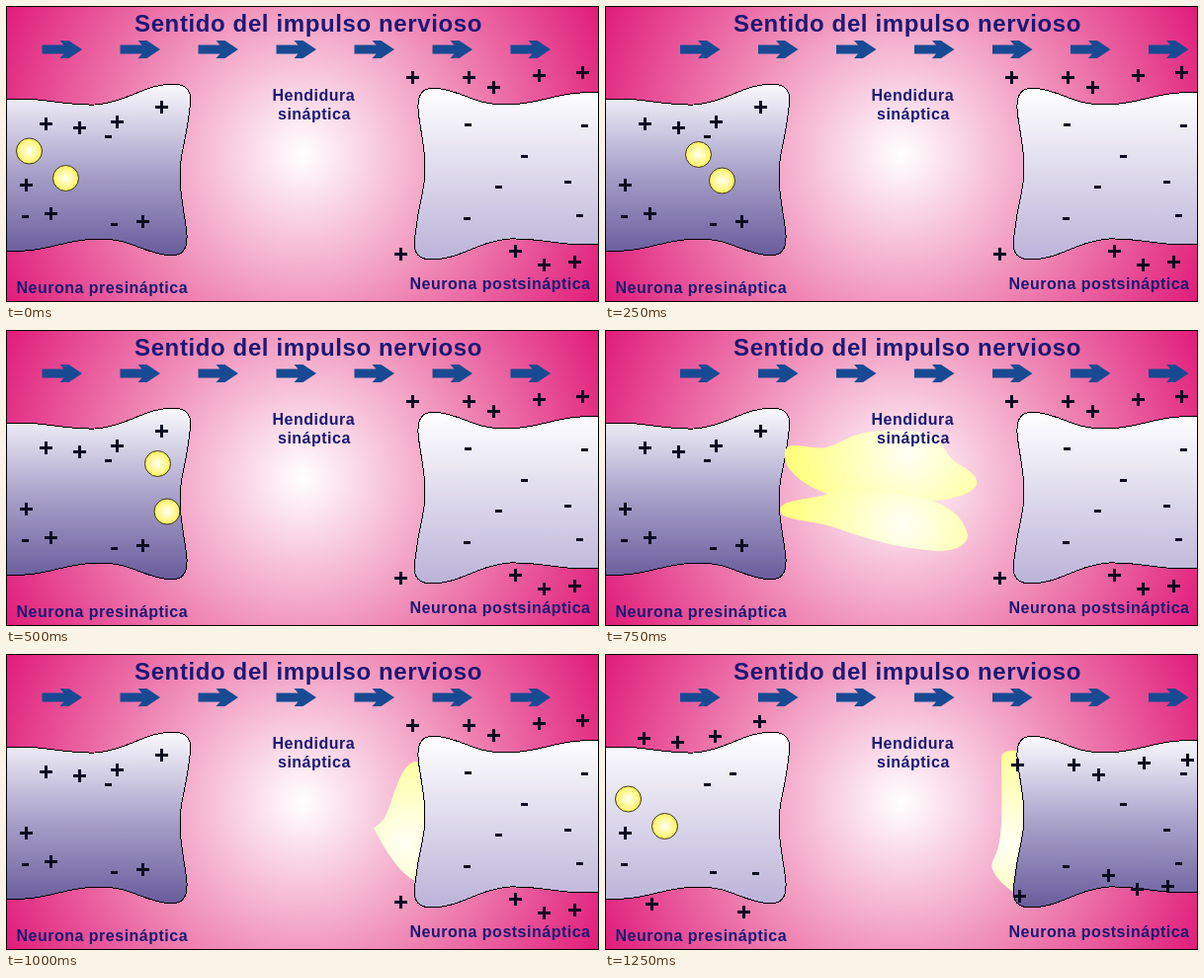
Recreate the animation shown at these times as an HTML page. Size 600x300 px, loop 1500 ms.

```html
<!DOCTYPE html>
<html lang="es">
<head>
<meta charset="utf-8">
<title>Sentido del impulso nervioso</title>
<style>
html, body { margin: 0; width: 100%; height: 100%; overflow: hidden; }
svg { display: block; width: 600px; height: 300px; }
text { font: bold 16px "Liberation Sans", Arial, sans-serif; letter-spacing: 0.5px; fill: #1c1873; }
.title { font-size: 24px; letter-spacing: 0.62px; }
.cell { stroke: #000; shape-rendering: crispEdges; }
.sign { stroke: #0b0b20; stroke-width: 3; fill: none; shape-rendering: crispEdges; }
.ball { fill: url(#ball); stroke: #3a3320; }
.arrow { fill: #174a92; }
</style>
</head>
<body>
<svg viewBox="0 0 600 300">
  <defs>
    <radialGradient id="back" gradientUnits="userSpaceOnUse" cx="300" cy="150" r="335">
      <stop offset="0" stop-color="#fff"/>
      <stop offset="0.5" stop-color="#f08cb7"/>
      <stop offset="1" stop-color="#e01c7a"/>
    </radialGradient>
    <linearGradient id="dark" x2="0" y2="1">
      <stop offset="0" stop-color="#fafafe"/>
      <stop offset="0.5" stop-color="#aaa3cb"/>
      <stop offset="1" stop-color="#685c9b"/>
    </linearGradient>
    <linearGradient id="light" x2="0" y2="1">
      <stop offset="0" stop-color="#fff"/>
      <stop offset="1" stop-color="#bbb3d8"/>
    </linearGradient>
    <radialGradient id="ball">
      <stop offset="0.05" stop-color="#fffff0"/>
      <stop offset="1" stop-color="#fff35a"/>
    </radialGradient>
  </defs>
  <rect width="600" height="300" fill="url(#back)"/>
  <g id="scene"></g>
  <text class="title" x="130" y="26">Sentido del impulso nervioso</text>
  <text x="269.5" y="96">Hendidura</text>
  <text x="275" y="115">sináptica</text>
  <text x="10.5" y="291">Neurona presináptica</text>
  <text x="408.5" y="287">Neurona postsináptica</text>
  <rect x="0.5" y="0.5" width="599" height="299" fill="none" stroke="#000"/>
</svg>
<script>
const STEP = 250;
const scene = document.getElementById('scene');

function add(parent, tag, attrs) {
  const el = document.createElementNS('http://www.w3.org/2000/svg', tag);
  for (const key in attrs) el.setAttribute(key, attrs[key]);
  return parent.appendChild(el);
}

// The right cell is the left one turned by half a circle.
const leftCell = 'M-5 95 C35 91 55 101 90 100 C122 98 140 79 170 79 C192 80 187 97 184 118 ' +
  'C181 140 176 150 176 172 C176 195 182 215 183 232 C184 252 174 254 160 252 ' +
  'C135 248 125 236 95 236 C55 236 45 251 -5 248 Z';
const rightCell = leftCell.replace(/(-?\d+) (\d+)/g, (_, x, y) => `${600 - x} ${336 - y}`);

// Charges that cross a membrane together share one shift.
const plusGroups = [
  { at: [[40, 119], [74, 123], [112, 117], [157, 102]], shift: [-1, -34] },
  { at: [[45, 210], [138, 218]], shift: [2, 43] },
  { at: [[20, 181]], shift: [0, 0] },
  { at: [[411, 72], [468, 72], [493, 82], [539, 70], [583, 67]], shift: [6, 40] },
  { at: [[399, 251]], shift: [20, -6] },
  { at: [[515, 248], [544, 262], [575, 259]], shift: [-6, -24] }
];
const minusStay = [[103, 132], [19, 213], [109, 221], [585, 121], [524, 152], [568, 178],
  [466, 215], [580, 212]];
const minusRest = [[467, 120], [498, 183]];
const minusFired = [[129, 121], [152, 222]];

const upperCloud = { glow: [308, 122], d: 'M182 124C184 110 208 122 224 119C244 114 246 103 285 102' +
  'C325 101 335 104 347 126C354 138 378 142 376 156C372 170 335 174 308 175' +
  'C270 174 240 171 222 165C200 156 180 142 182 124' };
const lowerCloud = { glow: [302, 197], d: 'M177 182C178 172 205 172 222 167C250 158 300 166 325 171' +
  'C350 178 364 192 367 208C366 220 352 224 336 224C300 222 265 212 235 201C210 192 176 194 177 182' };
const arriving = { glow: [405, 191],
  d: 'M372 176C388 168 388 150 396 132C402 116 410 106 418 110H440V230H414C398 222 384 200 372 176' };
const absorbed = { glow: [405, 212],
  d: 'M401 104C404 97 412 97 420 99H436V243H416C404 236 388 220 392 211C402 190 402 180 401 104' };

const home = [[23.5, 147], [60.5, 174.5]];
const steps = [
  { balls: home },
  { balls: [[94.5, 150.5], [118.5, 177]] },
  { balls: [[153.5, 135.5], [163, 184]] },
  { front: [upperCloud, lowerCloud] },
  { behind: [arriving] },
  { balls: home, behind: [absorbed], fired: true }
];

function drawCloud(g, { glow: [cx, cy], d }) {
  const id = `glow${cx}`;
  const grad = add(g, 'radialGradient', { id, cx, cy, r: 125, gradientUnits: 'userSpaceOnUse' });
  add(grad, 'stop', { offset: 0.02, 'stop-color': '#fffff4' });
  add(grad, 'stop', { offset: 1, 'stop-color': '#ffff78' });
  add(g, 'path', { d, fill: `url(#${id})` });
}

function drawSigns(g, fired) {
  const plus = plusGroups.flatMap(({ at, shift: [dx, dy] }) =>
    at.map(([x, y]) => fired ? [x + dx, y + dy] : [x, y]));
  const minus = minusStay.concat(fired ? minusFired : minusRest);
  const d = plus.map(([x, y]) => `M${x - 6} ${y + 0.5}h13M${x + 0.5} ${y - 6}v13`)
    .concat(minus.map(([x, y]) => `M${x - 3} ${y + 0.5}h7`)).join('');
  add(g, 'path', { class: 'sign', d });
}

function drawStep({ balls = [], behind = [], front = [], fired = false }, i) {
  const g = add(scene, 'g', {});
  for (let k = 0; k < 7; k++) {
    const x = 36.5 + k * 79 + (i % 2) * 39.5;
    add(g, 'path', { class: 'arrow', transform: `translate(${x} 35)`,
      d: 'M0 4.5H22L18 0H27L40.5 9L27 18H18L22 13.5H0Z' });
  }
  behind.forEach(cloud => drawCloud(g, cloud));
  add(g, 'path', { class: 'cell', d: leftCell, fill: `url(#${fired ? 'light' : 'dark'})` });
  add(g, 'path', { class: 'cell', d: rightCell, fill: `url(#${fired ? 'dark' : 'light'})` });
  drawSigns(g, fired);
  front.forEach(cloud => drawCloud(g, cloud));
  balls.forEach(([cx, cy]) => add(g, 'circle', { class: 'ball', cx, cy, r: 13 }));
  return g;
}

const poses = steps.map(drawStep);
const start = performance.now();

function tick() {
  const current = Math.floor((performance.now() - start) / STEP) % poses.length;
  poses.forEach((g, i) => { g.style.visibility = i === current ? 'visible' : 'hidden'; });
  requestAnimationFrame(tick);
}
tick();
</script>
</body>
</html>
```
